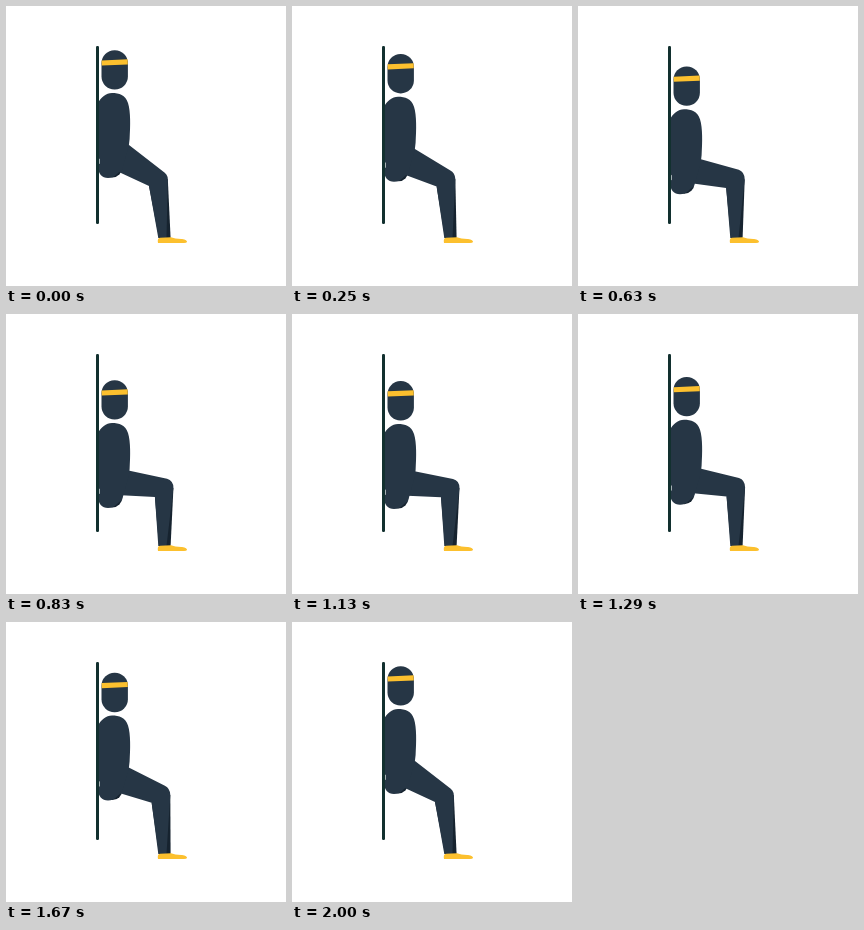
An HTML page with a canvas that plays this animation: 280 px wide and 280 px high, repeating every 2040 ms.

```html
<!DOCTYPE html>
<html lang="en">
<head>
<meta charset="utf-8">
<title>Wall sit</title>
<style>
html, body { margin: 0; width: 100%; height: 100%; overflow: hidden; background: #fff; }
canvas { display: block; width: 280px; height: 280px; }
</style>
</head>
<body>
<canvas id="stage"></canvas>
<script>
const SIZE = 280, LOOP = 2040, FPS = 24, DEPTH = 23;
const NAVY = '#263645', SHADE = '#16232f', WALL = '#12302f', YELLOW = '#fcc02e';

const canvas = document.getElementById('stage');
const ctx = canvas.getContext('2d');
const ratio = window.devicePixelRatio || 1;
canvas.width = canvas.height = SIZE * ratio;
ctx.scale(ratio, ratio);

// Squat depth in pixels at each step
const keys = [[0, 0], [5, 2.7], [11, 11], [20, 22], [24, 23.3], [27, 22.9], [35, 13.8], [40, 6.6], [48, 0]];

function slope(i) {
  const a = keys[i - 1], b = keys[i + 1];
  return a && b ? (b[1] - a[1]) / (b[0] - a[0]) : 0;
}

function depth(n) {
  let i = 0;
  while (i < keys.length - 2 && n >= keys[i + 1][0]) i++;
  const [x0, y0] = keys[i], [x1, y1] = keys[i + 1];
  const w = x1 - x0, s = Math.min(1, (n - x0) / w), r = 1 - s;
  return r * r * (1 + 2 * s) * y0 + s * r * r * w * slope(i)
    + s * s * (3 - 2 * s) * y1 - s * s * r * w * slope(i + 1);
}

// Smooth blend through the high, middle and low pose
function pose(q, high, mid, low) {
  const m = 0.48;
  const a = (q - m) * (q - 1) / m;
  const b = q * (q - 1) / (m * (m - 1));
  const c = q * (q - m) / (1 - m);
  return high.map((v, i) => v * a + mid[i] * b + low[i] * c);
}

function fill(path, color) {
  ctx.fillStyle = color;
  ctx.fill(path instanceof Path2D ? path : new Path2D(path));
}

function disc(x, y, r, color) {
  const p = new Path2D();
  p.arc(x, y, r, 0, Math.PI * 2);
  fill(p, color);
}

function bar(x, y, w, h, r, color) {
  const p = new Path2D();
  p.roundRect(x, y, w, h, r);
  fill(p, color);
}

const torso = new Path2D(`M91.5 98 C95 91 100 87 106 87 C113 87 119.5 89 122 97
  C124.8 106 124.4 120 123.6 133 L122.8 140 L116 164
  C111 167 109 172 102 172 C96 172 92 168 92 160 Z`);
const band = 'M95.6 54.4 L121.6 53.3 L121.8 58.5 L95.8 59.6 Z';
const shoe = `M152 237 Q151 232.4 154 231.8 L165 231.2 Q169 233 176 232.9
  Q181.5 234 181 236 Q180.5 237 178 237 Z`;

function drawLegs(d) {
  const q = d / DEPTH;
  const hip = pose(q, [123, 139], [122, 149], [122.5, 157.2]);
  const top = pose(q, [156.5, 165], [160, 163.5], [161, 165]);
  const bend = pose(q, [161.6, 168], [165.4, 166], [167.4, 166.6]);
  const knee = pose(q, [161.8, 173], [165.6, 173], [167.5, 174]);
  const back = pose(q, [143, 180], [147, 181.3], [149, 183.3]);
  const seat = pose(q, [115, 167], [115, 174.3], [115.5, 181.8]);

  fill(`M${knee} L164.6 232 L153 232 L${back} Z`, SHADE);
  fill(`M${hip} L${top} Q${bend} ${knee} L160.5 232 L152.3 232
    L${back} L${seat} L106 ${162 + d} L108 ${142 + d} Z`, NAVY);
}

function draw(n) {
  const d = depth(n);
  ctx.fillStyle = '#fff';
  ctx.fillRect(0, 0, SIZE, SIZE);

  // Round tip that briefly peeks over the lower edge
  const tip = 278.2 + 2 * ((n - 12) / 3) ** 2;
  if (tip < SIZE) disc(151, tip + 12, 12, NAVY);

  disc(106.3, 161.5 + d, 10, SHADE);
  drawLegs(d);

  ctx.save();
  ctx.translate(0, d);
  fill(torso, NAVY);
  bar(95.5, 44.2, 26.4, 39.4, 13, NAVY);
  fill(band, YELLOW);
  bar(93.1, 152.5, 0.8, 5.5, 0.4, '#c8d0d0');
  ctx.restore();

  fill(shoe, YELLOW);
  bar(90, 40, 3, 178, 1.2, WALL);
}

const start = performance.now();
function tick(now) {
  const t = Math.max(0, now - start) % LOOP;
  draw(Math.min(48, Math.floor(t * FPS / 1000 + 0.1)));
  requestAnimationFrame(tick);
}
draw(0);
requestAnimationFrame(tick);
</script>
</body>
</html>
```
